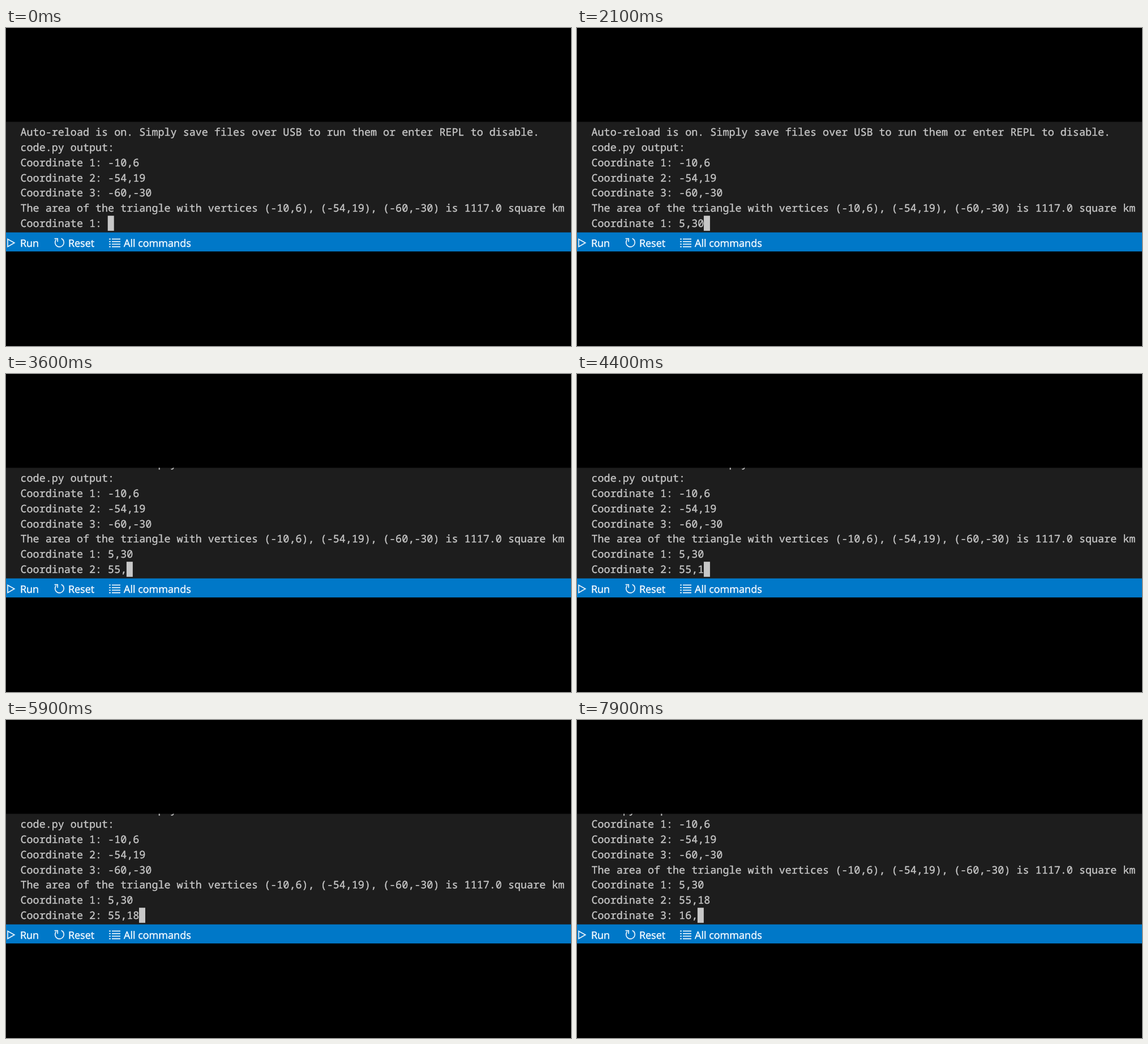
Write an HTML page that moves like this. It is 998x561 px and loops after 8000 ms.

```html
<!DOCTYPE html>
<html lang="en">
<head>
<meta charset="utf-8">
<title>Serial console</title>
<style>
  html, body { margin: 0; width: 100%; height: 100%; overflow: hidden; background: #000; }
  svg { display: block; width: 100%; height: 100%; }
  text { text-rendering: geometricPrecision; stroke-width: .45; }
  .log text {
    font: 18.42px "Noto Sans Mono", "DejaVu Sans Mono", monospace;
    font-variant-ligatures: none;
    fill: #c8c8c8; stroke: #c8c8c8; stroke-opacity: .8;
  }
  .bar text { font: 18px "Open Sans", "Noto Sans", sans-serif; fill: #f4faff; stroke: #f4faff; }
  .icon { fill: none; stroke: #e8f3fb; stroke-width: 1.7; }
</style>
</head>
<body>
<svg viewBox="0 0 998 561">
  <defs><clipPath id="view"><rect y="165.5" width="998" height="195"/></clipPath></defs>
  <rect width="998" height="561" fill="#000"/>
  <rect y="165.5" width="998" height="196" fill="#1d1d1d"/>
  <g class="log" clip-path="url(#view)">
    <g id="rows"></g>
    <rect id="cursor" y="331.2" width="11" height="26.6" fill="#c8c8c8"/>
  </g>
  <g class="bar">
    <rect y="360.6" width="998" height="33.6" fill="#0078c8"/>
    <path class="icon" d="M3 372.4V385.8L14.8 379.1Z"/>
    <text x="24.9" y="386">Run</text>
    <path class="icon" d="M97.6 371.2A7.8 7.8 0 1 1 88.6 373.2M85.6 371.6H91.2V377.2"/>
    <text x="109.9" y="386">Reset</text>
    <path class="icon" d="M187 372.4H202M187 376.9H202M187 381.4H202M187 385.9H202
      M182 372.4H185M182 376.9H185M182 381.4H185M182 385.9H185"/>
    <text x="208" y="386">All commands</text>
  </g>
</svg>
<script>
  const LOOP = 8000, LEFT = 25, CELL = 11.052, PITCH = 26.75, BASE = 190.4;
  const history = [
    'Auto-reload is on. Simply save files over USB to run them or enter REPL to disable.',
    'code.py output:',
    'Coordinate 1: -10,6',
    'Coordinate 2: -54,19',
    'Coordinate 3: -60,-30',
    'The area of the triangle with vertices (-10,6), (-54,19), (-60,-30) is 1117.0 square km'
  ];
  // Key presses: time in ms, key ('\n' is Enter)
  const keys = [
    [700, '5'], [1100, ','], [1500, '3'], [1800, '0'], [2500, '\n'],
    [2900, '5'], [3100, '5'], [3500, ','], [4200, '1'], [4600, '8'], [6000, '\n'],
    [7000, '1'], [7300, '6'], [7700, ',']
  ];

  const rows = document.getElementById('rows');
  const cursor = document.getElementById('cursor');
  const lines = Array.from({ length: history.length + 3 }, (_, i) => {
    const line = document.createElementNS('http://www.w3.org/2000/svg', 'text');
    line.setAttribute('x', LEFT + .5);
    line.setAttribute('y', BASE + i * PITCH);
    line.textContent = history[i] || '';
    return rows.appendChild(line);
  });

  let shown = null;
  function draw(time) {
    const typed = keys.filter(([at]) => at <= time).map(([, key]) => key).join('');
    if (typed === shown) return;
    shown = typed;
    const inputs = typed.split('\n');
    const prompts = inputs.map((value, i) => `Coordinate ${i + 1}: ${value}`);
    for (let i = 0; i < 3; i++) lines[history.length + i].textContent = prompts[i] || '';
    rows.setAttribute('transform', `translate(0 ${-(inputs.length - 1) * PITCH})`);
    cursor.setAttribute('x', LEFT + prompts[prompts.length - 1].length * CELL);
  }

  const start = performance.now();
  function tick() {
    draw((performance.now() - start) % LOOP);
    requestAnimationFrame(tick);
  }
  tick();
</script>
</body>
</html>
```
